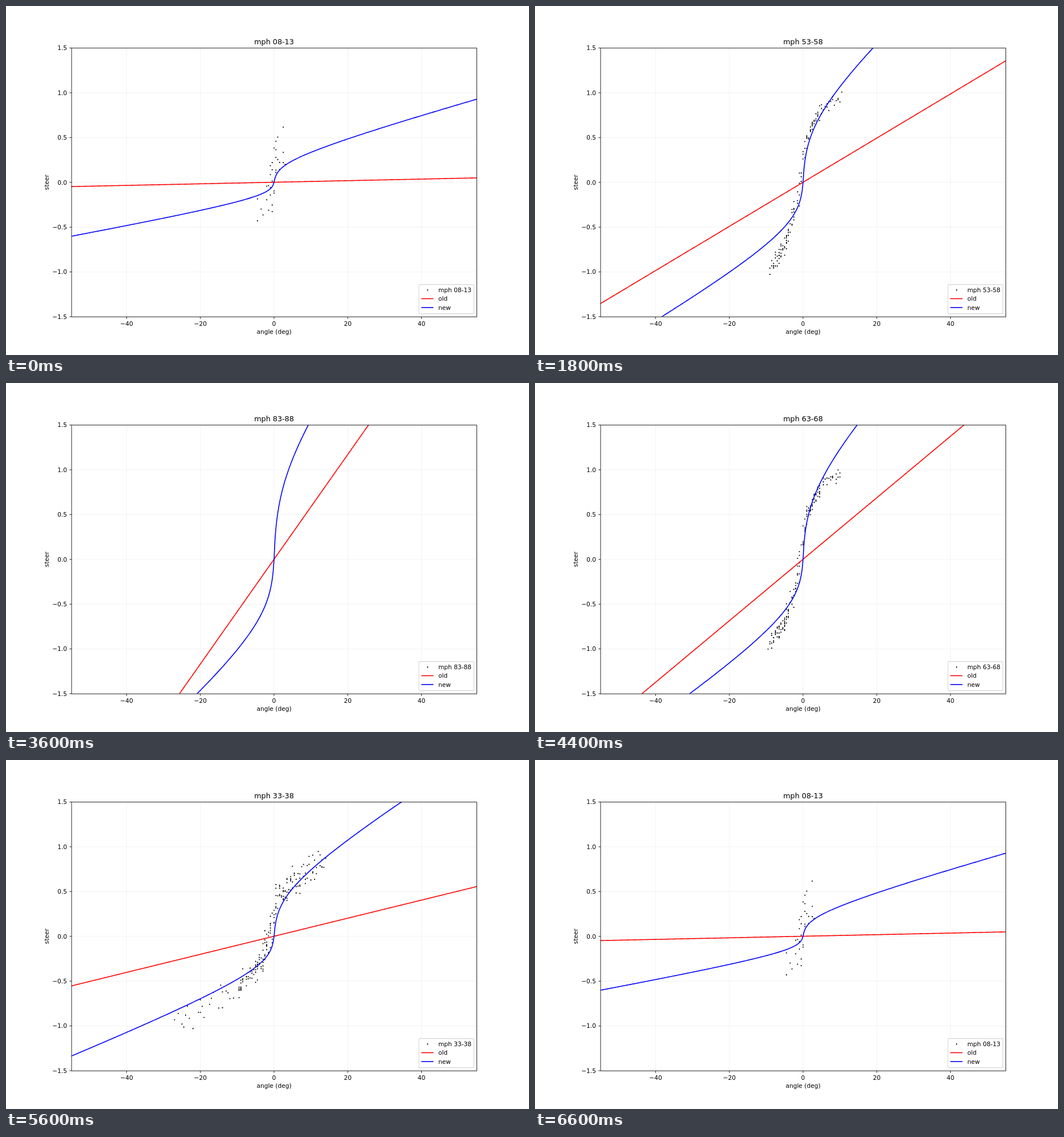
Animation of 917 by 611 pixels, one loop 6800 ms. Source, as an HTML page:

```html
<!DOCTYPE html>
<html>
<head>
<meta charset="utf-8">
<style>
html, body { margin: 0; width: 100%; height: 100%; overflow: hidden; background: #fff; }
svg { display: block; width: 917px; height: 611px; font: 10.61px "DejaVu Sans", sans-serif; }
</style>
</head>
<body>
<svg viewBox="0 0 917 611" xmlns="http://www.w3.org/2000/svg">
  <defs><clipPath id="plot"><rect x="114.6" y="73.3" width="710.7" height="470.5"/></clipPath></defs>
  <rect width="917" height="611" fill="#fff"/>
  <g clip-path="url(#plot)">
    <path id="dots" fill="#000"/>
    <path id="grid" stroke="#b0b0b0" stroke-opacity=".2" stroke-width=".85"/>
    <path id="old" fill="none" stroke="#f00" stroke-width="1.6"/>
    <path id="new" fill="none" stroke="#00f" stroke-width="1.6" stroke-linejoin="round"/>
  </g>
  <path id="ticks" stroke="#000" stroke-width=".85"/>
  <rect x="115" y="73.7" width="710.5" height="470.5" fill="none" stroke="#000" stroke-width=".85"/>
  <g id="labels"></g>
  <text x="470" y="574.2" text-anchor="middle">angle (deg)</text>
  <text transform="translate(74.8 308.6) rotate(-90)" text-anchor="middle">steer</text>
  <text id="title" x="470" y="67" text-anchor="middle" font-size="12.73"></text>
  <rect x="724" y="487.6" width="96.2" height="51" rx="2.2" fill="#fff" fill-opacity=".8" stroke="#ccc" stroke-opacity=".8" stroke-width="1.06"/>
  <circle cx="739.2" cy="497.4" r="1.05"/>
  <path d="M728.2 512.4h21.3" stroke="#f00" stroke-width="1.6"/>
  <path d="M728.2 527.9h21.3" stroke="#00f" stroke-width="1.6"/>
  <text id="key" x="758" y="500.5"></text>
  <text x="758" y="516.1">old</text>
  <text x="758" y="531.6">new</text>
</svg>
<script>
const $ = id => document.getElementById(id);
const CX = 470, CY = 308.55, SX = 6.461, SY = 156.82;
const px = deg => CX + deg * SX, py = steer => CY - steer * SY;
const STEP = 200, COUNT = 17;

const lerp = (a, b, u) => a + (b - a) * u;
const clamp = u => Math.min(1, Math.max(0, u));

// Middle of the sample cloud, [angle, steer], at low and at high speed
const SLOW = [[-27, -.96], [-10, -.6], [-6.2, -.42], [-3.5, -.27], [-1, 0], [1, .45], [3.8, .56], [7.5, .66], [14, .88]];
const FAST = [[-9, -.98], [-7, -.83], [-5.3, -.74], [-3.9, -.57], [-1.5, -.2], [.8, .5], [2.7, .64], [5, .84], [10.5, .97]];
// Number of samples by speed
const AMOUNT = [[8, 33], [33, 200], [53, 125], [63, 150], [78, 0]];

// Point at u (0 to 1) on an evenly timed polyline
function along(line, u) {
  const s = u * (line.length - 1), i = Math.min(line.length - 2, Math.floor(s));
  return [0, 1].map(k => lerp(line[i][k], line[i + 1][k], s - i));
}

function amount(mph) {
  const i = AMOUNT.findIndex(p => p[0] > mph);
  if (i < 0) return 0;
  const [a, b] = [AMOUNT[i - 1], AMOUNT[i]];
  return Math.round(lerp(a[1], b[1], (mph - a[0]) / (b[0] - a[0])));
}

function random(seed) {
  return () => {
    seed = (seed * 1664525 + 1013904223) % 4294967296;
    return seed / 4294967296;
  };
}

function dotPath(mph) {
  const rnd = random(mph * 7919);
  const noise = () => rnd() + rnd() + rnd() - 1.5;
  const fast = clamp((mph - 33) / 20);
  const reach = clamp(.2 + (mph - 8) / 20);
  const spread = lerp(.3, lerp(.16, .08, fast), reach);
  const n = amount(mph);
  let d = '';
  for (let i = 0; i < n; i++) {
    const u = (i + rnd()) / n;
    const [a0, s0] = along(SLOW, u), [a1, s1] = along(FAST, u);
    const angle = lerp(a0, a1, fast) * reach + noise() * lerp(1, .5, fast);
    const steer = lerp(s0, s1, fast) * lerp(.3, 1, reach) + noise() * spread;
    // Angles are measured in half degrees
    const x = px(Math.round(angle * 2) / 2) - 1.05;
    d += `M${x.toFixed(2)} ${py(steer).toFixed(2)}a1.05 1.05 0 1 0 2.1 0a1.05 1.05 0 1 0-2.1 0`;
  }
  return d;
}

const oldSteer = (a, v) => 8e-6 * v * v * a;

function newSteer(a, v) {
  const x = Math.abs(a), side = a < 0 ? -.65 : 1;
  return side * (v + 10) / 20.5 * (.0584 * Math.log1p(4.5 * x) + .011 * x);
}

function curve(fn, v) {
  let d = '';
  for (let a = -55; a <= 55; a += .25) {
    d += (d ? 'L' : 'M') + px(a).toFixed(2) + ' ' + py(fn(a, v)).toFixed(2);
  }
  return d;
}

const bins = Array.from({ length: COUNT }, (_, i) => {
  const mph = 8 + 5 * i, mid = mph + 2.5;
  return {
    name: `mph ${String(mph).padStart(2, '0')}-${mph + 5}`,
    dots: dotPath(mph),
    old: curve(oldSteer, mid),
    new: curve(newSteer, mid)
  };
});

function buildAxes() {
  let grid = '', ticks = '', labels = '';
  const num = s => s.replace('-', '\u2212');
  for (let a = -40; a <= 40; a += 20) {
    const x = px(a).toFixed(2);
    grid += `M${x} 73.3V543.8`;
    ticks += `M${x} 544.2v3.7`;
    labels += `<text x="${x}" y="559.7" text-anchor="middle">${num(String(a))}</text>`;
  }
  for (let s = -1.5; s <= 1.5; s += .5) {
    const y = py(s) + .2;
    grid += `M114.6 ${y}H825.3`;
    ticks += `M115 ${y}h-3.7`;
    labels += `<text x="107" y="${y + 3.9}" text-anchor="end">${num(s.toFixed(1))}</text>`;
  }
  $('grid').setAttribute('d', grid);
  $('ticks').setAttribute('d', ticks);
  $('labels').innerHTML = labels;
}

// Speeds climb to the top bin, then fall back; both ends show twice
let shown = -1;
function draw(ms) {
  const step = Math.floor(ms / STEP) % (2 * COUNT);
  const i = Math.min(step, 2 * COUNT - 1 - step);
  if (i === shown) return;
  shown = i;
  const bin = bins[i];
  for (const id of ['dots', 'old', 'new']) $(id).setAttribute('d', bin[id]);
  $('title').textContent = $('key').textContent = bin.name;
}

buildAxes();
draw(0);
const start = performance.now();
(function tick() {
  draw(performance.now() - start);
  requestAnimationFrame(tick);
})();
</script>
</body>
</html>
```
